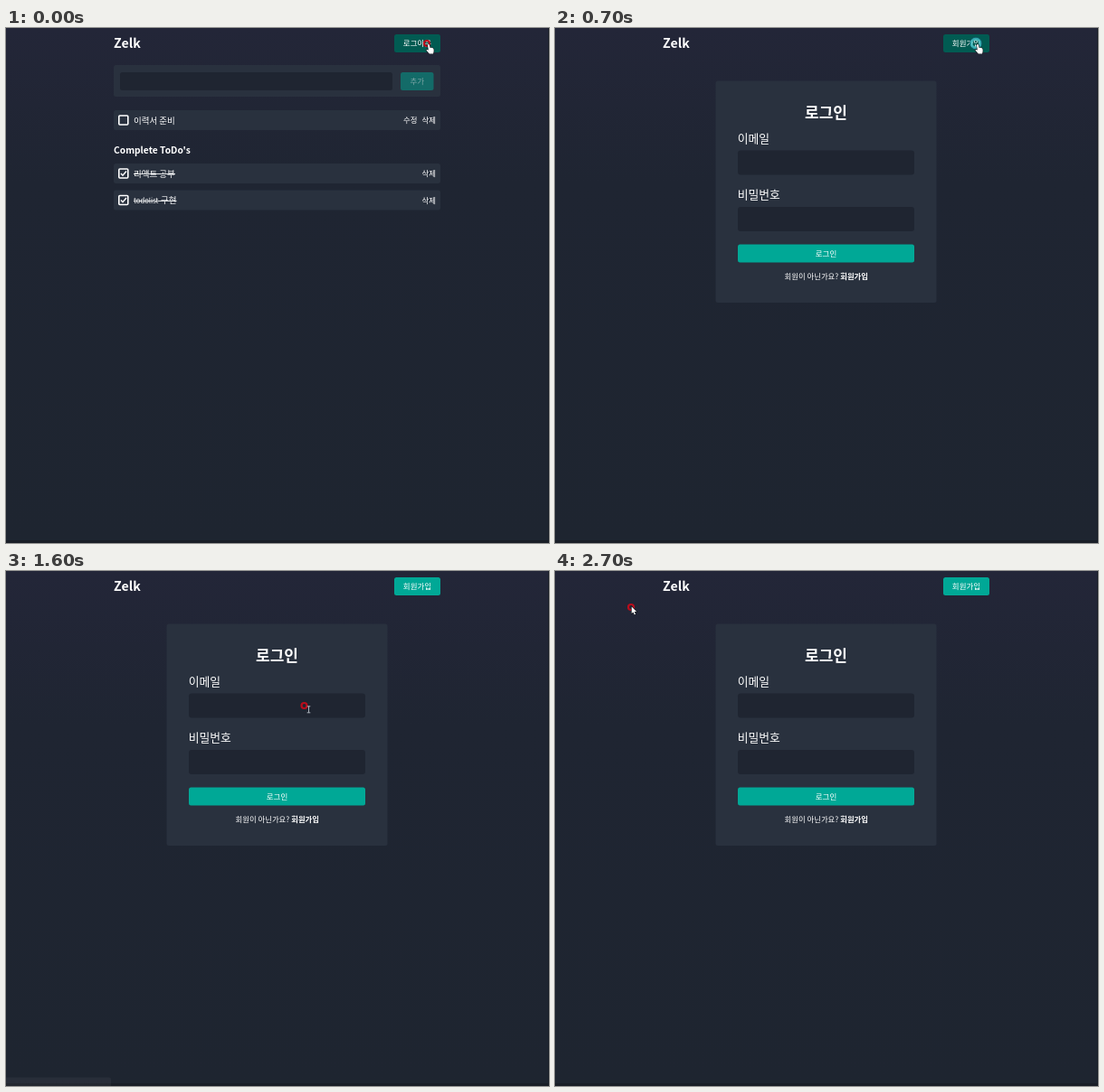
These frames come from a looping animation (600 by 570 pixels, 2.8 s). An HTML page with a canvas:

```html
<!DOCTYPE html>
<html>
<head>
<meta charset="utf-8">
<style>
html, body { margin: 0; width: 100%; height: 100%; overflow: hidden; background: #1e2530; }
canvas { display: block; }
</style>
</head>
<body>
<canvas id="stage" width="600" height="570"></canvas>
<script>
const ctx = document.getElementById('stage').getContext('2d');
const LOOP = 2800, STEP = 100;
const CARD = '#29313e', FIELD = '#1f2531', TEAL = [0, 168, 150], TEAL_HOVER = [1, 91, 82];
const KOREAN = '"Noto Sans CJK KR", "Noto Sans KR", "Noto Sans CJK", sans-serif';

// Pointer keyframes: time, x, y
const PATH = [[0, 465, 17], [1000, 465, 17], [1300, 331, 164], [1600, 329.5, 149],
  [2100, 314.5, 144.5], [2400, 295, 139], [2700, 84, 40], [2800, 84, 40]];
const CLICKS = [540, 1880], CLICK_LENGTH = 300;

const clamp = v => Math.max(0, Math.min(1, v));
const ramp = (t, from, to) => clamp((t - from) / (to - from));
const mix = (a, b, k) => a + (b - a) * k;
const inside = (p, x, y, w, h) => p.x >= x && p.x <= x + w && p.y >= y && p.y <= y + h;

function box(x, y, w, h, fill, r = 2.5) {
  ctx.fillStyle = fill;
  ctx.beginPath();
  ctx.roundRect(x, y, w, h, r);
  ctx.fill();
}

// y is the vertical middle of the glyphs
function text(str, x, y, size, { bold, align = 'left', color = '#fff', font = KOREAN } = {}) {
  ctx.font = `${bold ? 'bold ' : ''}${size}px ${font}`;
  ctx.textAlign = align;
  ctx.fillStyle = color;
  ctx.fillText(str, x, y + size * 0.38);
}

function line(points, color, width) {
  ctx.strokeStyle = color;
  ctx.lineWidth = width;
  ctx.beginPath();
  points.forEach(([x, y]) => ctx.lineTo(x, y));
  ctx.stroke();
}

function ring(x, y, r, color, width) {
  ctx.strokeStyle = color;
  ctx.lineWidth = width;
  ctx.beginPath();
  ctx.arc(x, y, r, 0, Math.PI * 2);
  ctx.stroke();
}

function background() {
  const sky = ctx.createLinearGradient(0, 0, 0, 570);
  sky.addColorStop(0, '#232638');
  sky.addColorStop(0.3, '#1f2532');
  sky.addColorStop(1, '#1e2530');
  ctx.fillStyle = sky;
  ctx.fillRect(0, 0, 600, 570);
  ctx.fillStyle = '#191e27';
  ctx.fillRect(0, 567, 600, 3);
  ctx.fillRect(599, 0, 1, 570);
}

function header(label, hover) {
  text('Zelk', 119, 17, 14.2, { bold: true });
  const color = TEAL.map((c, i) => Math.round(mix(c, TEAL_HOVER[i], hover)));
  box(429, 7, 51, 20, `rgb(${color})`);
  text(label, 454.5, 17, 8.5, { align: 'center' });
}

function todoRow(y, done) {
  box(119, y, 361, 22, CARD);
  ctx.strokeStyle = '#fff';
  ctx.lineWidth = 1.6;
  ctx.beginPath();
  ctx.roundRect(124.8, y + 6, 10, 10, 1);
  ctx.stroke();
  if (done) line([[127, y + 11], [129, y + 13.2], [133, y + 8.6]], '#fff', 1.5);
  else text('수정', 446.7, y + 11, 8.4, { align: 'center' });
  text('삭제', 467.2, y + 11, 8.4, { align: 'center' });
}

function todoPage() {
  box(119, 41, 361, 35, CARD);
  box(126, 49, 301, 20, FIELD);
  box(436, 49, 36.5, 20, '#136b68');
  text('추가', 454.3, 59, 8.5, { align: 'center', color: '#7ba5a6' });
  todoRow(91, false);
  text('이력서 준비', 141, 102, 9.5);
  text("Complete ToDo's", 119, 135.3, 10.25, { bold: true });
  todoRow(150, true);
  text('리액트 공부', 141, 161, 9.5);
  line([[141, 161.5], [187, 161.5]], '#e4e6e8', 1);
  todoRow(179.5, true);
  text('todolist', 141, 190.7, 7.7);
  text('구현', 171, 190.5, 9.5);
  line([[141, 191.5], [188.5, 191.5]], '#e4e6e8', 1);
}

function loginPage(caret) {
  box(177.5, 58.5, 244, 245.5, CARD);
  text('로그인', 299.5, 94, 17, { bold: true, align: 'center' });
  text('이메일', 201.7, 122, 12.8);
  box(202, 135.5, 195, 27, FIELD, 3);
  text('비밀번호', 201.7, 184.5, 12.8);
  box(202, 198, 195, 27, FIELD, 3);
  box(202, 239.5, 195, 20, `rgb(${TEAL})`);
  text('로그인', 299.5, 249.7, 8.5, { align: 'center' });
  text('회원이 아닌가요?', 253.5, 274.7, 8.4);
  text('회원가입', 346, 274.7, 8.4, { bold: true, align: 'right' });
  if (caret) line([[209.5, 142.5], [209.5, 155]], '#dfe2e6', 1);
}

function statusBar(alpha) {
  if (!alpha) return;
  ctx.globalAlpha = alpha;
  box(0, 560.5, 116, 9.5, '#dee1e5', [0, 2, 0, 0]);
  text('https://mern-zelk.herokuapp.com/register', 2, 565.5, 5.65,
    { color: '#50545a', font: '"Open Sans", sans-serif' });
  ctx.globalAlpha = 1;
}

function pointerAt(t) {
  const i = PATH.findIndex(k => k[0] > t);
  const [t0, x0, y0] = PATH[i - 1], [t1, x1, y1] = PATH[i];
  const k = ramp(t, t0, t1), ease = k * k * (3 - 2 * k);
  return { x: mix(x0, x1, ease), y: mix(y0, y1, ease) };
}

function shape(x, y, d) {
  const path = new Path2D(d);
  ctx.save();
  ctx.translate(x, y);
  ctx.strokeStyle = '#15181f';
  ctx.lineWidth = 1.2;
  ctx.stroke(path);
  ctx.fillStyle = '#fff';
  ctx.fill(path);
  ctx.restore();
}

function highlight(p, t) {
  const start = CLICKS.find(c => t >= c && t < c + CLICK_LENGTH);
  if (start === undefined) return ring(p.x, p.y, 3, '#b90d1c', 2.2);
  const hole = 4.2 * ramp(t, start, start + 200);
  const outer = 6.8, glow = ctx.createRadialGradient(p.x, p.y, 0, p.x, p.y, outer + 1.5);
  glow.addColorStop(0, 'rgba(150,225,228,0.9)');
  glow.addColorStop(0.75, 'rgba(45,178,184,0.85)');
  glow.addColorStop(1, 'rgba(20,90,110,0.3)');
  ring(p.x, p.y, (outer + hole) / 2, glow, outer - hole);
  ring(p.x, p.y, outer, 'rgba(20,80,96,0.7)', 1);
}

function pointer(p, login) {
  const onField = login && (inside(p, 202, 135.5, 195, 27) || inside(p, 202, 198, 195, 27));
  if (inside(p, 429, 7, 51, 20)) {
    shape(p.x, p.y, 'M1 1.5Q2 .5 2.8 1.6L3.6 5Q5.6 4.4 7 5.6Q8.4 7.4 7 11.5H2.8L-.6 7.6Q-.4 6.4 1.8 7.4Z');
  } else if (onField) {
    const x = p.x + 5, y = p.y + 4.3;
    line([[x, y - 3.5], [x, y + 3.5]], '#a9afb8', 1);
    for (const dy of [-3.5, 3.5]) line([[x - 1.8, y + dy], [x + 1.8, y + dy]], '#a9afb8', 1);
  } else {
    shape(p.x + 0.7, p.y - 0.5, 'M0 0V7.6L1.8 6L3.1 8.9L4.3 8.3L3 5.5H5.4Z');
  }
}

function draw(t) {
  const login = t >= 700, p = pointerAt(t);
  background();
  header(login ? '회원가입' : '로그아웃', 1 - ramp(t, 1050, 1250));
  if (login) loginPage(t >= 1880 && t < 2380);
  else todoPage();
  statusBar(ramp(t, 780, 950) * (1 - ramp(t, 1400, 1610)));
  highlight(p, t);
  pointer(p, login);
}

function tick(now) {
  draw(Math.floor((now % LOOP) / STEP) * STEP);
  requestAnimationFrame(tick);
}
requestAnimationFrame(tick);
</script>
</body>
</html>
```
